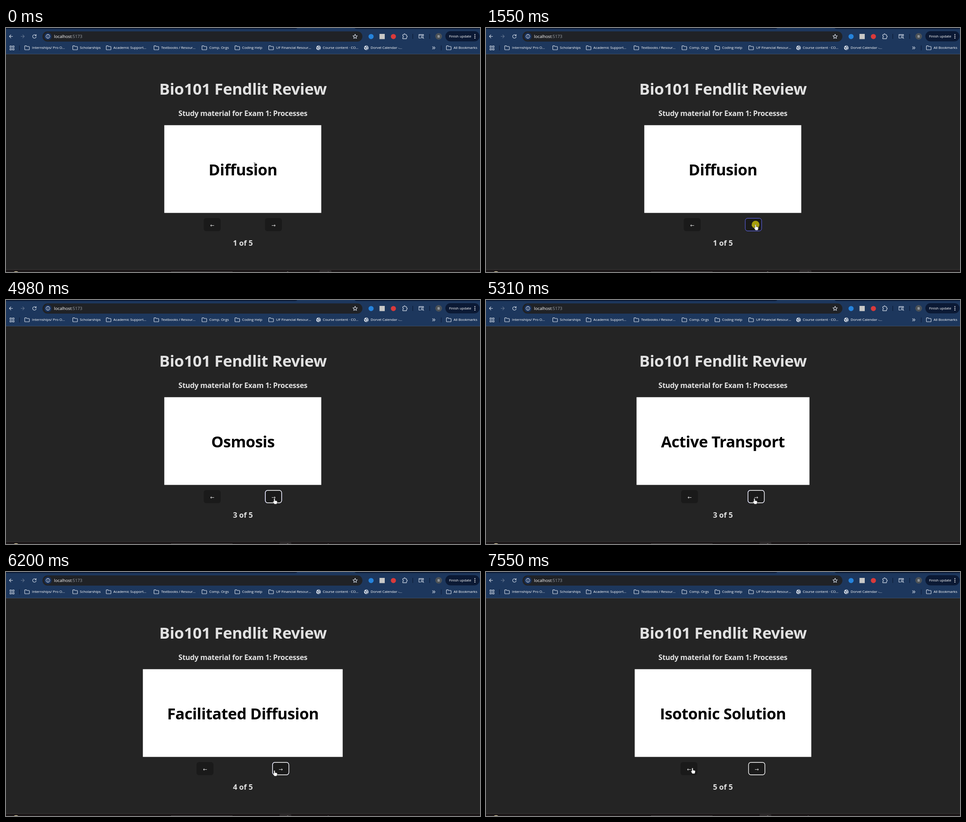
Animation, 1040 px wide and 538 px high, one loop 8000 ms. Source, as an HTML page:

```html
<!DOCTYPE html>
<html lang="en">
<head>
<meta charset="utf-8">
<title>Flash cards</title>
<style>
  html, body { margin: 0; width: 100%; height: 100%; overflow: hidden; background: #242424; }
  svg { display: block; }
  text { font-family: "Open Sans", "Noto Sans", sans-serif; white-space: pre; }
  .bar text { font-size: 7.9px; letter-spacing: -.06px; fill: #fff; }
  .bar .url { font-size: 9.4px; letter-spacing: -.1px; }
  .line { fill: none; stroke: #d6deea; stroke-width: 1.1; stroke-linecap: round; stroke-linejoin: round; }
  .bold { font-weight: 700; text-anchor: middle; fill: #e2e2e2; }
  #term { font-size: 34px; letter-spacing: -.5px; fill: #000; }
  .arrow { font: 11px "DejaVu Sans", sans-serif; text-anchor: middle; fill: #e4e4e4; }
</style>
</head>
<body>
<svg width="1040" height="538" viewBox="0 0 1040 538">
  <rect width="1040" height="538" fill="#242424"/>

  <g class="bar">
    <rect width="1040" height="57" fill="#1d375d"/>
    <path d="M0 0H639Q638 2.2 634 2.2H0ZM765 0H1040V2.2H770Q766 2.2 765 0Z" fill="#0a1832"/>
    <rect y="57" width="1040" height="1" fill="#3b4b63"/>

    <g class="line">
      <path d="M14.5 18.5H7.5M10.7 15.2L7.4 18.5L10.7 21.8"/>
      <path d="M33 18.5H40M36.8 15.2L40.1 18.5L36.8 21.8" stroke="#63758f"/>
      <path d="M65.6 16.4A3.9 3.9 0 1 0 66.2 19.4M66.2 14.2V17H63.3"/>
    </g>

    <rect x="80" y="7.5" width="702" height="22.5" rx="11.2" fill="#202226"/>
    <circle cx="92" cy="18.5" r="8.2" fill="#17305a"/>
    <circle class="line" cx="92" cy="18.5" r="4.1"/>
    <path class="line" d="M92 18.3V20.6M92 16.4V16.5"/>
    <text class="url" x="105.5" y="22">localhost<tspan fill="#9ba1a9">:5173</tspan></text>
    <path class="line" d="M766 13.8L767.4 17L770.9 17.3L768.2 19.6L769 23L766 21.2L763 23L763.8 19.6L761.1 17.3L764.6 17Z"/>

    <circle cx="801" cy="18.8" r="5.6" fill="#2583dc"/>
    <rect x="819.5" y="13" width="11.5" height="11.5" fill="#c9c9c7"/>
    <circle cx="850" cy="18.8" r="5.6" fill="#d93a3a"/>
    <path class="line" d="M870.5 14.8H873Q873 12.9 874.5 12.9T876 14.8H878.8V17.6Q880.6 17.6 880.6 19T878.8 20.5V23.6H870.5V20.7Q872.3 20.6 872.3 19.2T870.5 17.7Z"/>
    <path class="line" d="M910 22.3H906V14.3H916V17M906 16H916"/>
    <circle class="line" cx="913.2" cy="19.8" r="2"/>
    <path class="line" d="M914.8 21.4L916.6 23.2"/>
    <path d="M892.5 13V24M929.5 13V24" stroke="#0c1c38" stroke-width="1.2"/>
    <circle cx="949.3" cy="18.4" r="7.2" fill="#4c5257"/>
    <text x="949.3" y="21" text-anchor="middle">B</text>
    <rect x="964" y="7" width="75" height="22.5" rx="11.2" fill="#0b1934"/>
    <text x="972" y="21.3">Finish update</text>
    <g fill="#fff"><circle cx="1028.8" cy="14.6" r="1.1"/><circle cx="1028.8" cy="18.4" r="1.1"/><circle cx="1028.8" cy="22.2" r="1.1"/></g>

    <path class="line" d="M8.7 39.5H12V42.8H8.7ZM14.4 39.5H17.7V42.8H14.4ZM8.7 45.2H12V48.5H8.7ZM14.4 45.2H17.7V48.5H14.4Z"/>
    <path d="M29.5 38.5V49.5M955 38.5V49.5" stroke="#0c1c38" stroke-width="1.2"/>
    <path class="line" d="M935.8 41.2L938.2 43.8L935.8 46.4M939 41.2L941.4 43.8L939 46.4"/>
    <g id="marks"></g>
  </g>

  <text class="bold" x="520" y="147" font-size="34.5" letter-spacing="-.3">Bio101 Fendlit Review</text>
  <text class="bold" x="519.8" y="194" font-size="16" letter-spacing="-.29">Study material for Exam 1: Processes</text>

  <rect id="card" y="214.3" height="193.4" fill="#fff"/>
  <text id="term" class="bold" x="519.8" y="325"></text>
  <g id="prev">
    <rect x="-18.5" y="419" width="37" height="29" rx="5.5" fill="#1a1a1a"/>
    <text class="arrow" y="439">←</text>
  </g>
  <g id="next">
    <rect x="-18.5" y="419" width="37" height="29" rx="5.5" fill="#1a1a1a"/>
    <rect id="hover" x="-18" y="419.5" width="36" height="28" rx="5.2" fill="none" stroke="#646cff"/>
    <rect id="ring" x="-17.8" y="419.7" width="35.8" height="27.6" rx="5.2" fill="none" stroke="#fff" stroke-width="1.4"/>
    <text class="arrow" y="439">→</text>
  </g>
  <text id="count" class="bold" x="519.8" y="480" font-size="16.4"></text>

  <rect y="532" width="1040" height="6" fill="#1b1718"/>
  <rect y="532" width="1040" height="1" fill="#3b3839"/>
  <rect id="task" y="534" width="26" height="6" rx="2" fill="#2f2c2d"/>
  <rect x="362" y="537" width="135" height="1" fill="#4b4849"/>
  <ellipse cx="22" cy="538.5" rx="4.5" ry="2" fill="#f0e3b4"/>
  <circle cx="618" cy="538.3" r="1.6" fill="#77706f"/>
  <circle cx="707" cy="538.3" r="1.4" fill="#5b5657"/>

  <circle id="click" r="8.5" fill="#b3a90b" fill-opacity=".92"/>
  <g id="pointer" stroke-linejoin="round">
    <path id="beam" d="M-2 -4.5H-.5L0 -4L.5 -4.5H2M0 -4V4M-2 4.5H-.5L0 4L.5 4.5H2" fill="none" stroke="#333" stroke-width=".9"/>
    <path id="hand" d="M-1.2 1A1.2 1.2 0 0 1 1.2 1V4.6L5 5.5Q6.3 5.9 6.2 7.2L5.6 10.6Q5.2 12.4 4 12.4H.6Q-.4 12.4-1 11.4L-3.2 7.6Q-3.5 6.3-2.3 6.2L-1.2 7Z" fill="#fff" stroke="#222" stroke-width=".5"/>
    <path id="point" d="M0 0V10L2.3 7.9L3.8 11.3L5.2 10.7L3.7 7.3H6.7Z" fill="#fff" stroke="#111" stroke-width=".5"/>
  </g>
</svg>
<script>
const $ = id => document.getElementById(id);
const LOOP = 8000, MID = 519.6;

const folder = x => `<path class="line" d="M${x} 40.3Q${x} 39.4 ${x + 1} 39.4H${x + 3.8}L${x + 5} 40.8H${x + 9.3}Q${x + 10.3} 40.8 ${x + 10.3} 41.8V47Q${x + 10.3} 48 ${x + 9.3} 48H${x + 1}Q${x} 48 ${x} 47Z"/>`;
const globe = x => `<circle cx="${x + 5}" cy="43.7" r="4.9" fill="#dfe5ee"/><path d="M${x + 1.3} 42.3L${x + 4} 43.8L${x + 3.6} 46.8M${x + 5} 39.8L${x + 5.8} 42L${x + 8.7} 42.6M${x + 6} 47.6L${x + 8} 45" fill="none" stroke="#1d375d" stroke-width="1.3"/>`;

const bookmarks = [
  [folder, 41, 57, "Internships/ Pro O..."],
  [folder, 146.5, 162, "Scholarships"],
  [folder, 220, 235.5, "Academic Support..."],
  [folder, 324.7, 340.5, "Textbooks / Resour..."],
  [folder, 430, 446, "Comp. Orgs"],
  [folder, 502.3, 518, "Coding Help"],
  [folder, 576.5, 592.5, "UF Financial Resour..."],
  [globe, 680.7, 695, "Course content · CO..."],
  [globe, 785.5, 800, "Dorvel Calendar -..."],
  [folder, 966.3, 982, "All Bookmarks"],
];
$("marks").innerHTML = bookmarks
  .map(([icon, x, tx, label]) => icon(x) + `<text x="${tx}" y="46.4">${label}</text>`).join("");

// term, card width, distance of the buttons from the middle
const cards = [
  ["Diffusion", 345, 67.2],
  ["Osmosis", 345, 67.2],
  ["Active Transport", 380, 73],
  ["Facilitated Diffusion", 439, 83],
  ["Isotonic Solution", 388, 74.3],
];

// each step changes only the listed values
const steps = [
  [0, { card: 0, count: 1, task: 688, shape: "beam", x: 545.5, y: 301.5, hover: 0, ring: 0, click: 0 }],
  [70, { shape: "" }],
  [1080, { shape: "hand", x: 591.5, y: 431, hover: .3 }],
  [1145, { hover: .65 }],
  [1210, { hover: 1 }],
  [1480, { click: 1 }],
  [1550, { y: 433.5 }],
  [4070, { x: 589, y: 437.6, click: 0, task: 600 }],
  [4430, { card: 1, count: 2, ring: 1 }],
  [4910, { click: 1 }],
  [4980, { click: 0, count: 3 }],
  [5310, { card: 2 }],
  [5640, { click: 1 }],
  [5780, { click: 0 }],
  [6200, { card: 3, count: 4 }],
  [6630, { click: 1 }],
  [6760, { click: 0, card: 4, count: 5 }],
  [6960, { shape: "point", x: 568, y: 439, hover: 0 }],
  [7030, { x: 558, y: 438 }],
  [7550, { shape: "hand", x: 453, y: 432.3 }],
];

const set = (id, name, value) => $(id).setAttribute(name, value);

function draw(t) {
  const s = Object.assign({}, ...steps.filter(([at]) => at <= t).map(([, change]) => change));
  const [term, width, gap] = cards[s.card];
  set("card", "x", Math.round(MID - width / 2) + .3);
  set("card", "width", width - .6);
  $("term").textContent = term;
  $("count").textContent = `${s.count} of 5`;
  set("prev", "transform", `translate(${MID - gap} 0)`);
  set("next", "transform", `translate(${MID + gap} 0)`);
  set("hover", "opacity", s.hover);
  set("ring", "opacity", s.ring);
  set("task", "x", s.task);
  set("click", "opacity", s.click);
  for (const id of ["click", "pointer"]) set(id, "transform", `translate(${s.x} ${s.y})`);
  for (const id of ["beam", "hand", "point"]) set(id, "opacity", +(id === s.shape));
}

const start = performance.now();
function tick() {
  draw((performance.now() - start) % LOOP);
  requestAnimationFrame(tick);
}
tick();
</script>
</body>
</html>
```
